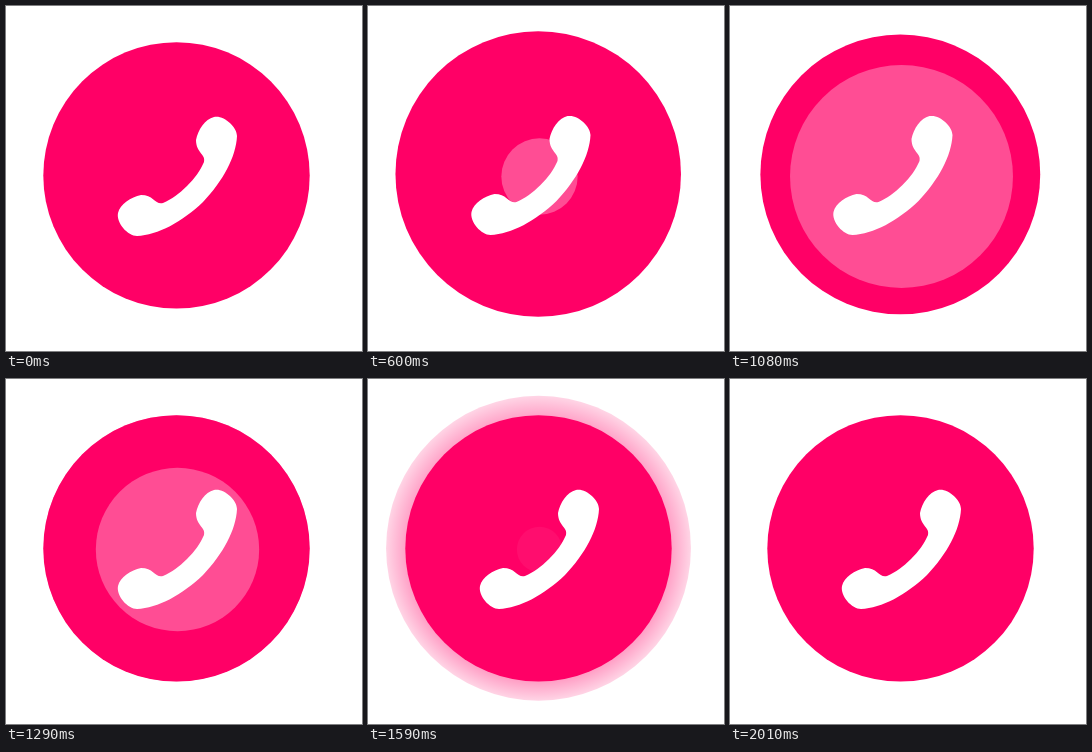
These frames come from a looping animation (356x345 px, 2.4 s). An HTML page with a canvas:

```html
<!DOCTYPE html>
<html lang="en">
<head>
<meta charset="utf-8">
<title>Ringing call button</title>
<style>
  html, body { margin: 0; width: 100%; height: 100%; overflow: hidden; background: #fff; }
  canvas { display: block; }
</style>
</head>
<body>
<canvas id="stage" width="356" height="345"></canvas>
<script>
const ctx = document.getElementById('stage').getContext('2d');
const LOOP = 2400, STEP = 30;
const PINK = '#ff0066';

const progress = (t, from, to) => Math.min(1, Math.max(0, (t - from) / (to - from)));
const mix = (a, b, k) => a + (b - a) * k;

function circle(x, y, r, fill) {
  ctx.fillStyle = fill;
  ctx.beginPath();
  ctx.arc(x, y, r, 0, Math.PI * 2);
  ctx.fill();
}

// Half of the handset, from the inner middle to the outer middle, as cubic segments.
const HALF = [
  [[181, 180]],
  [[189, 172], [194, 165], [198, 156]],
  [[200, 148], [190, 147], [190, 134]],
  [[192, 124], [199, 113], [208, 111]],
  [[218, 109], [231, 121], [231, 130]],
  [[230, 151], [217, 175], [197, 196]]
];

function handsetPath() {
  const path = new Path2D();
  const mirror = ([x, y]) => [y + 1, x - 1];
  path.moveTo(...HALF[0][0]);
  for (const seg of HALF.slice(1)) path.bezierCurveTo(...seg.flat());
  for (let i = HALF.length - 1; i > 0; i--) {
    const [c1, c2] = HALF[i], end = HALF[i - 1].at(-1);
    path.bezierCurveTo(...mirror(c2), ...mirror(c1), ...mirror(end));
  }
  path.closePath();
  return path;
}
const handset = handsetPath();

function drawHalo(t) {
  const fade = 1 - progress(t, 1290, 1980);
  if (t < 1290 || fade === 0) return;
  const r = mix(133, 167, progress(t, 1290, 1815));
  const y = 169.2 + 2.3 * progress(t, 1590, 1815);
  const glow = ctx.createRadialGradient(170.5, y + 2, 130, 170.5, y, r + 2);
  glow.addColorStop(0, `rgba(255,0,102,${0.7 * fade})`);
  glow.addColorStop(1, `rgba(255,0,102,${0.26 * fade})`);
  circle(170.5, y, r, glow);
}

function drawDisc(t) {
  const swell = t < 840
    ? progress(t, 200, 840) ** 1.2
    : (1 - progress(t, 840, 1290)) ** 1.2;
  circle(170.5 - 0.5 * swell, 169.4 - 2.4 * swell, mix(133.2, 150, swell), PINK);
}

function drawRipple(t) {
  const r = t < 1113
    ? mix(0, 116.5, progress(t, 350, 1113))
    : mix(116.5, 0, progress(t, 1113, 1705));
  const alpha = 0.3 * (1 - progress(t, 1290, 1650));
  if (r > 0 && alpha > 0) circle(171.5, 170.5, r, `rgba(255,255,255,${alpha})`);
}

function drawHandset(t) {
  const swing = Math.sin(progress(t, 240, 1200) * Math.PI * 4);
  ctx.save();
  ctx.translate(8.5 * swing, -0.9 * Math.abs(swing));
  ctx.fillStyle = '#fff';
  ctx.fill(handset);
  ctx.restore();
}

function frame(now) {
  const t = Math.floor((now % LOOP) / STEP) * STEP;
  ctx.fillStyle = '#fff';
  ctx.fillRect(0, 0, 356, 345);
  drawHalo(t);
  drawDisc(t);
  drawRipple(t);
  drawHandset(t);
}

const start = performance.now();
function tick() {
  frame(performance.now() - start);
  requestAnimationFrame(tick);
}
tick();
</script>
</body>
</html>
```
